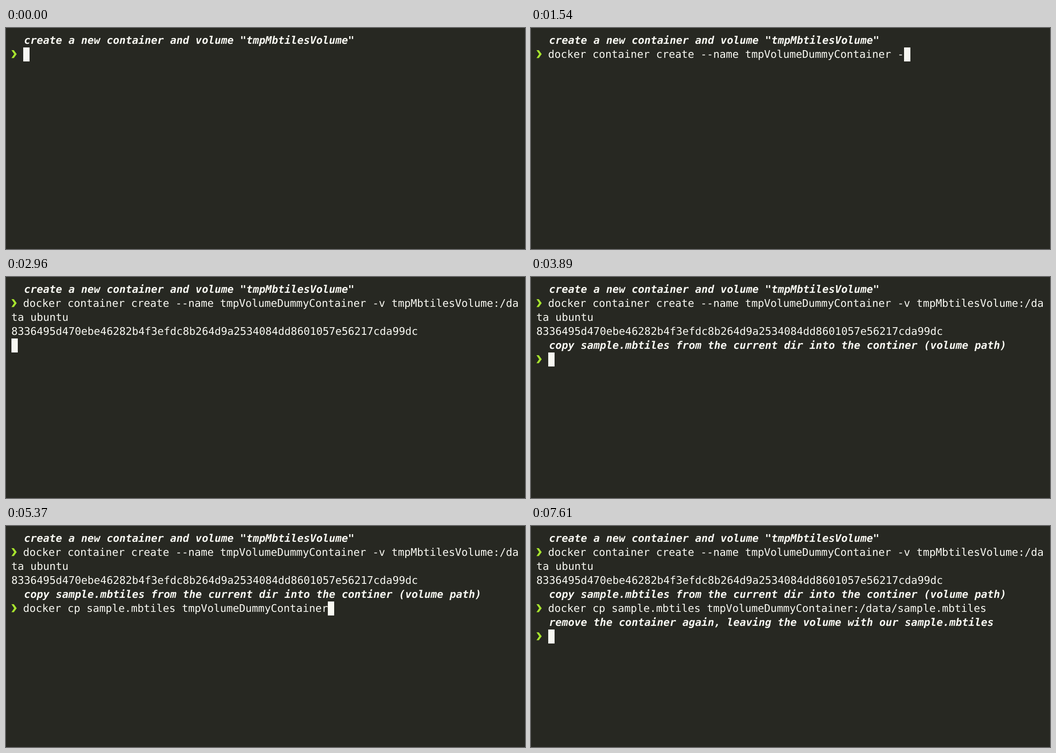
Animation, 1145 px wide and 489 px high, one loop 8000 ms. Source, as an HTML page:

```html
<!DOCTYPE html>
<html lang="en">
<head>
<meta charset="utf-8">
<title>Terminal session</title>
<style>
  html, body { margin: 0; width: 100%; height: 100%; overflow: hidden; background: #272822; }
  #screen {
    padding: .5em;
    font: 23.29px/calc(4em / 3) "DejaVu Sans Mono", monospace;
    color: #f8f8f2;
    white-space: pre;
    text-rendering: geometricPrecision;
    font-variant-ligatures: none;
  }
  .row { height: calc(4em / 3); }
  .note { font-weight: bold; font-style: italic; }
  .prompt, .cursor { display: inline-block; height: 100%; vertical-align: top; }
  .prompt {
    width: 12px;
    background: #a6e22e;
    clip-path: polygon(.4px 6.2px, 5.6px 6.2px, 100% 15px, 5.6px 23.8px, .4px 23.8px, 6.4px 15px);
  }
  .cursor { background: #f8f8f2; }
</style>
</head>
<body>
<div id="screen"></div>
<script>
const LOOP = 8000;
const STEP = 60;
const FIRST_ROW_CHARS = 78; // an 80-column row minus the prompt and its space

const CREATE = 'docker container create --name tmpVolumeDummyContainer -v tmpMbtilesVolume:/data ubuntu';
const COPY = 'docker cp sample.mbtiles tmpVolumeDummyContainer:/data/sample.mbtiles';
const HASH = '8336495d470ebe46282b4f3efdc8b264d9a2534084dd8601057e56217cda99dc';

const PROMPT = '<span class="prompt"></span> ';
const CURSOR = '<span class="cursor"> </span>';

const note = text => [`<span class="note">  ${text}</span>`];

const command = text => {
  const rows = [PROMPT + text.slice(0, FIRST_ROW_CHARS)];
  if (text.length > FIRST_ROW_CHARS) rows.push(text.slice(FIRST_ROW_CHARS));
  return rows;
};

// Part of the text typed by time t, in bursts of `rate` characters per step.
const typed = (text, t, start, first, rate) =>
  t < start ? '' : text.slice(0, Math.floor(first + rate * Math.floor((t - start) / STEP) + 1e-6));

function rowsAt(t) {
  const rows = [
    ...note('create a new container and volume "tmpMbtilesVolume"'),
    ...command(typed(CREATE, t, 1000, 16 / 3, 17 / 3)),
  ];
  if (t >= 2900) rows.push('');
  if (t >= 2960) rows.splice(-1, 1, HASH, '');
  if (t >= 3890) rows.splice(-1, 1,
    ...note('copy sample.mbtiles from the current dir into the continer (volume path)'),
    ...command(typed(COPY, t, 4890, 4, 5.5)));
  if (t >= 6610) rows.push('');
  if (t >= 7610) rows.splice(-1, 1,
    ...note('remove the container again, leaving the volume with our sample.mbtiles'),
    ...command(''));
  rows[rows.length - 1] += CURSOR;
  return rows;
}

const screenEl = document.getElementById('screen');
let shown = '';

function draw() {
  const html = rowsAt(performance.now() % LOOP).map(row => `<div class="row">${row}</div>`).join('');
  if (html !== shown) screenEl.innerHTML = shown = html;
  requestAnimationFrame(draw);
}
draw();
</script>
</body>
</html>
```
